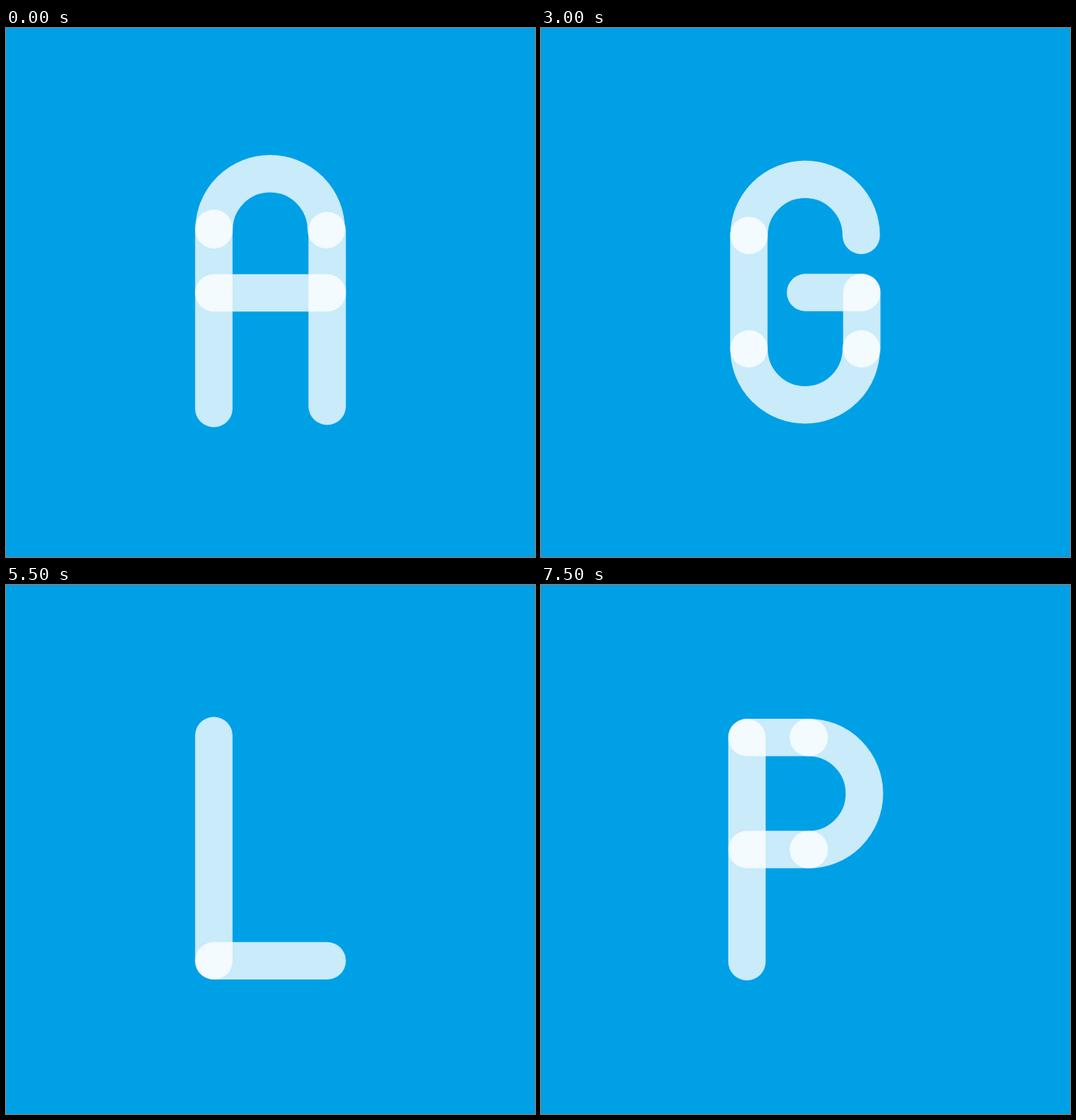
Animation, 700 px wide and 700 px high, one loop 8 s. Source, as an HTML page:

```html
<!DOCTYPE html>
<html lang="en">
<head>
<meta charset="utf-8">
<title>Stroke alphabet</title>
<style>
  html, body { margin: 0; width: 100%; height: 100%; overflow: hidden; background: #00a0e6; }
  svg { display: block; width: 100%; height: 100%; }
  path { fill: none; stroke: #fff; stroke-opacity: .79; stroke-width: 49.5; stroke-linecap: round; }
  g { visibility: hidden; animation: show 8s step-end infinite; }
  @keyframes show {
    0% { visibility: visible; }
    6.25%, 100% { visibility: hidden; }
  }
</style>
</head>
<body>
<svg id="stage" viewBox="0 0 700 700"></svg>
<script>
const R = 74.25;
const stem = (x, y1, y2) => `M${x} ${y1}V${y2}`;
const bar = (y, x1, x2) => `M${x1} ${y}H${x2}`;
const line = (x1, y1, x2, y2) => `M${x1} ${y1}L${x2} ${y2}`;
const arc = (x1, y1, x2, y2) => `M${x1} ${y1}A${R} ${R} 0 0 1 ${x2} ${y2}`;

// Half circles around a centre, named by the side they bulge to
const top_ = (x, y) => arc(x - R, y, x + R, y);
const bottom = (x, y) => arc(x + R, y, x - R, y);
const right = (x, y) => arc(x, y - R, x, y + R);

const letters = [
  /* A */ [stem(275, 265, 503.5), stem(425, 268, 500.5), top_(349.5, 267), bar(350.5, 275, 425)],
  /* B */ [stem(270.5, 201.5, 498.5), bar(201.5, 270.5, 356), bar(350, 270.5, 356),
           bar(498.5, 270.5, 356), right(355.5, 275.75), right(355.5, 424.25)],
  /* C */ [stem(275, 275, 426), top_(349.5, 275), bottom(349.5, 426)],
  /* D */ [stem(270.5, 199.5, 498.5), bar(199.5, 270.5, 356), bar(498.5, 270.5, 356),
           arc(356, 199.5, 356 + R, 199.5 + R), stem(356 + R, 199.5 + R, 498.5 - R),
           arc(356 + R, 498.5 - R, 356, 498.5)],
  /* E */ [stem(290, 201, 499), bar(201, 290, 410.5), bar(343.75, 290, 410.5), bar(499, 290, 410.5)],
  /* F */ [stem(290, 200, 498.5), bar(200, 290, 410.5), bar(343.5, 290, 410.5)],
  /* G */ [stem(275, 274.5, 424.5), top_(349.5, 274.5), bottom(349.5, 424.5),
           stem(424.5, 350, 424.5), bar(350, 350, 424.5)],
  /* H */ [stem(265, 201.5, 499.5), stem(435, 196.75, 495), bar(344.25, 265, 435)],
  /* I */ [stem(351.5, 198, 498.5), bar(198, 266.5, 436.5), bar(498.5, 266.5, 436.5)],
  /* J */ [bar(192, 296.25, 466.25), stem(382.25, 191, 413), bottom(308, 417)],
  /* K */ [stem(275, 199.5, 498), line(275, 374, 450, 199.5), line(305, 344, 467, 506)],
  /* L */ [stem(275, 199.25, 497.25), bar(497.25, 275, 425)],
  /* M */ [stem(200, 266, 499.5), stem(350, 266, 499.5), stem(500, 266, 499.5),
           top_(275, 274), top_(425, 274)],
  /* N */ [stem(275, 265.75, 498.5), stem(425, 265.75, 498.25), top_(349.5, 272)],
  /* O */ [stem(276, 275.5, 424.5), stem(425.5, 275.5, 424.5), top_(350.75, 275.5), bottom(350.75, 424.5)],
  /* P */ [stem(272.5, 201.75, 498.5), bar(201.75, 272.5, 355), bar(350, 272.5, 355), right(353.75, 275.9)]
];

document.getElementById("stage").innerHTML = letters.map((parts, i) =>
  `<g style="animation-delay:${(i - letters.length) * 0.5}s">` +
  parts.map(d => `<path d="${d}"/>`).join("") + "</g>").join("");
</script>
</body>
</html>
```
